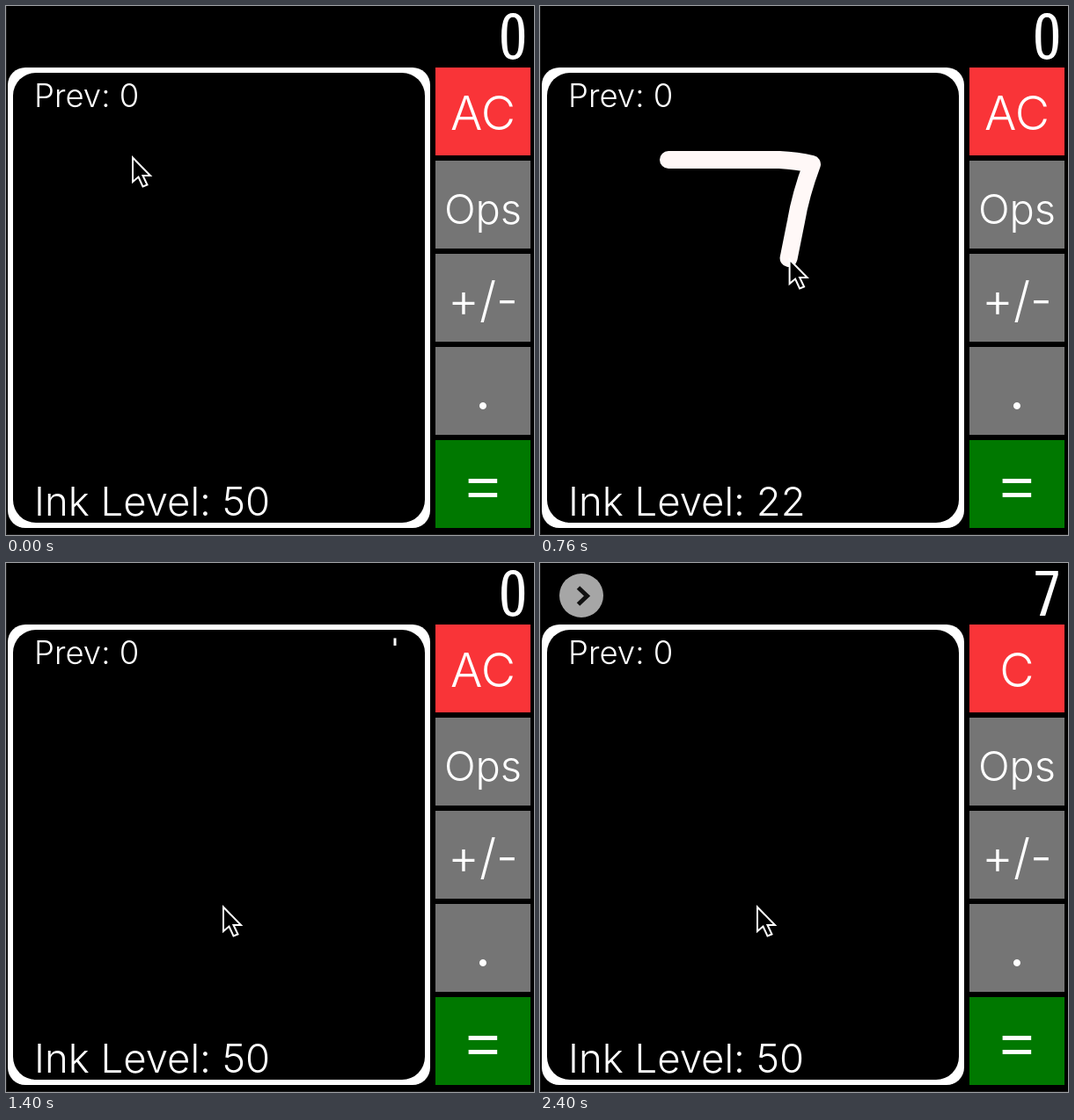
Recreate the animation shown at these times as an HTML page. Size 600 by 602 pixels, loop 3.12 s.

```html
<!DOCTYPE html>
<html lang="en">
<head>
<meta charset="utf-8">
<title>Handwriting calculator</title>
<style>
  html, body { margin: 0; width: 100%; height: 100%; overflow: hidden; background: #000; }
  svg { display: block; width: 600px; height: 602px; }
  text { font-family: Inter, Roboto, sans-serif; font-weight: 300; fill: #fff; }
  #keys text { text-anchor: middle; }
  /* the black outline thins the heavy condensed digits */
  #display {
    font: 400 77px "Noto Sans ExtraCondensed", "Open Sans Condensed", "Roboto Condensed", Roboto, sans-serif;
    font-stretch: 62.5%;
    text-anchor: end;
    stroke: #000;
    stroke-width: 4px;
  }
</style>
</head>
<body>
<svg viewBox="0 0 600 602">
  <rect width="600" height="602"/>
  <path d="M.5 0V601.5H600" fill="none" stroke="#1a1a1a"/>
  <text id="display" x="594" y="62">0</text>
  <g id="next">
    <circle cx="47" cy="37" r="25" fill="#a6a6a6"/>
    <path d="M43.5 28l10 9.5-10 9.5" fill="none" stroke="#111" stroke-width="5"/>
  </g>
  <rect x="2" y="70" width="480" height="524" rx="20" fill="#fff"/>
  <rect x="8" y="76" width="468" height="512" rx="26"/>
  <text x="32" y="114.5" font-size="36.5">Prev: 0</text>
  <text id="ink" x="32" y="580" font-size="45.5"></text>
  <g id="spinner" stroke="#fff" stroke-width="3"></g>
  <g id="keys"></g>
  <path id="stroke" d="M146 175H272Q292 176 309 180Q296 215 291 245L279 305Q268 350 246 390"
    fill="none" stroke="#fff8f7" stroke-width="20" stroke-linecap="round" stroke-linejoin="round"/>
  <path id="cursor" d="M1 2.5V30L7.5 24.5L12.5 35.5L17.5 33.5L12.5 23H21Z" stroke="#fff" stroke-width="2"/>
</svg>
<script>
const LOOP = 3120, STEP = 40, CLEAR = 1400, RESULT = 2320;
const $ = id => document.getElementById(id);
const [display, next, ink, spinner, keys, stroke, cursor] =
  ['display', 'next', 'ink', 'spinner', 'keys', 'stroke', 'cursor'].map($);

// label, fill, font size, baseline within the key
keys.innerHTML = [
  ['AC', '#f93438', 54, 71],
  ['Ops', '#757575', 47, 72],
  ['+/-', '#757575', 55, 72],
  ['.', '#757575', 76, 70.5],
  ['=', '#007800', 80, 77]
].map(([label, fill, size, base], i) => {
  const y = 70 + 106 * i;
  return `<rect x="488" y="${y}" width="108" height="100" fill="${fill}"/>
    <text x="542" y="${y + base}" font-size="${size}">${label}</text>`;
}).join('');
const clearKey = keys.querySelector('text');

spinner.innerHTML = Array.from({ length: 12 }, (_, i) =>
  `<path d="M442 85.5v8.5" transform="rotate(${30 * i} 442 104)"/>`).join('');

// Linear interpolation through [time, value] pairs
function track(points, t) {
  const i = points.findIndex(p => p[0] > t);
  if (i < 0) return points[points.length - 1][1];
  if (i === 0) return points[0][1];
  const [t0, a] = points[i - 1], [t1, b] = points[i];
  return a + (b - a) * (t - t0) / (t1 - t0);
}

const total = stroke.getTotalLength();
const corner = 164;
const lengthTrack = [[360, 0], [400, 45], [600, corner], [920, total]];
const inkTrack = [[120, 50], [360, 46], [600, 30], [920, 14], [1160, 12]];
const cursorX = [[80, 143], [240, 168], [360, 205], [600, 309]];
const cursorY = [[360, 170], [480, 172], [600, 179]];

function draw(now) {
  const t = Math.floor(now % LOOP / STEP) * STEP;
  const length = track(lengthTrack, t);
  const drawing = t >= 160 && t < CLEAR;
  const done = t >= RESULT;

  stroke.style.display = drawing ? '' : 'none';
  stroke.setAttribute('stroke-dasharray', `${Math.max(length, 0.01)} 999`);
  ink.textContent = 'Ink Level: ' + (t < CLEAR ? Math.round(track(inkTrack, t)) : 50);

  let x = track(cursorX, t), y = track(cursorY, t);
  if (t > 600) {
    const tip = stroke.getPointAtLength(length);
    x = tip.x;
    y = tip.y - 1;
  }
  cursor.setAttribute('transform', `translate(${x} ${y})`);

  const spokes = t < CLEAR || done ? 0 : Math.floor((t - CLEAR) / 80) + 1;
  [...spinner.children].forEach((s, i) => s.style.display = i < spokes ? '' : 'none');

  display.textContent = done ? '7' : '0';
  clearKey.textContent = done ? 'C' : 'AC';
  next.style.opacity = track([[RESULT - STEP, 0], [RESULT + 80, 1]], t);
}

const start = performance.now();
function frame() {
  draw(performance.now() - start);
  requestAnimationFrame(frame);
}
frame();
</script>
</body>
</html>
```
